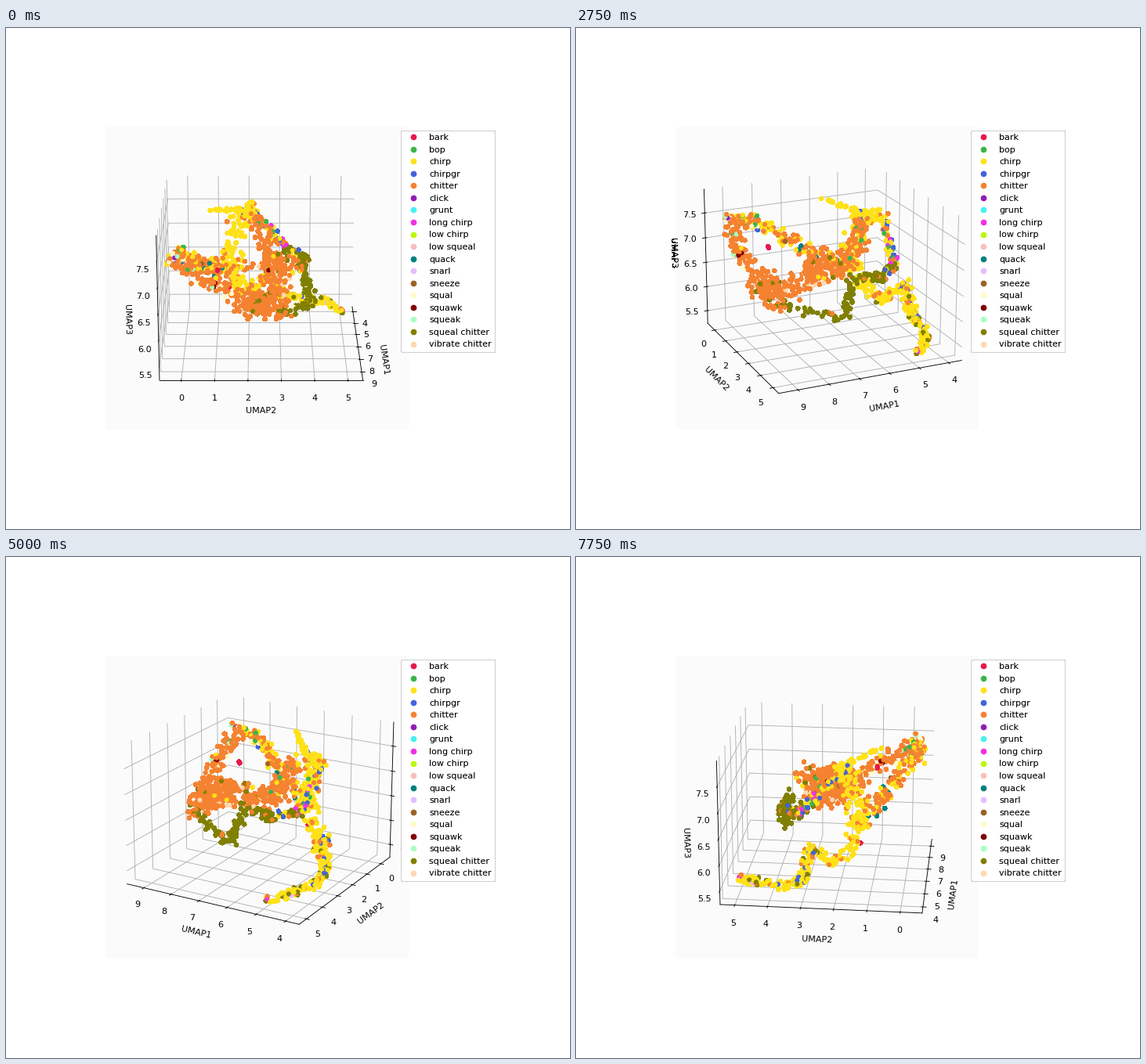
A matplotlib script that plays this animation: 720 px wide and 640 px high, repeating every 8 s.

```python
import numpy as np
import matplotlib.pyplot as plt
from matplotlib.animation import FuncAnimation
from matplotlib.lines import Line2D

W, H, DPI = 720, 640, 80
FRAMES, STEP_MS, STEP_DEG = 32, 250, 6
plt.rcParams["font.family"] = "DejaVu Sans"
rng = np.random.default_rng(7)

# One-letter key, call type, colour
CALLS = [
    ("k", "bark", "#e6194b"), ("b", "bop", "#3cb44b"),
    ("y", "chirp", "#ffe119"), ("g", "chirpgr", "#4363d8"),
    ("o", "chitter", "#f58231"), ("c", "click", "#911eb4"),
    ("t", "grunt", "#46f0f0"), ("m", "long chirp", "#f032e6"),
    ("l", "low chirp", "#bcf60c"), ("w", "low squeal", "#fabebe"),
    ("q", "quack", "#008080"), ("n", "snarl", "#e6beff"),
    ("z", "sneeze", "#9a6324"), ("p", "squal", "#fffac8"),
    ("r", "squawk", "#800000"), ("e", "squeak", "#aaffc3"),
    ("s", "squeal chitter", "#808000"), ("v", "vibrate chitter", "#ffd8b1"),
]
COLOR = {key: color for key, _, color in CALLS}

# Anchors of the cloud, measured from the middle of the box
SPOT = {
    "tip": (-.07, -.31, .39), "crest": (-.24, -.11, .33),
    "peak": (-.38, -.066, .29), "ridge": (-.354, .14, .06),
    "bend": (-.22, .265, .03), "hook": (-.03, .25, .05),
    "fang": (.05, .31, -.175), "keel": (.25, .20, -.13),
    "chin": (.39, .11, -.08), "jaw": (.40, .0, -.06),
    "neck": (.435, -.09, -.02), "cheek": (.478, -.28, .12),
    "nose": (.47, -.50, .26), "brow": (.29, -.505, .22),
    "arch": (.107, -.37, .115), "saddle": (-.05, -.285, .016),
    "drop": (-.22, -.19, -.04), "sag": (-.30, -.14, -.20),
    "dip": (-.38, -.04, -.237), "flank": (-.47, .07, -.11),
    "base": (-.505, .12, -.32), "shin": (-.50, .26, -.345),
    "heel": (-.46, .40, -.35), "toe": (-.338, .519, -.375),
    "head": (-.22, -.02, .27), "throat": (-.06, .07, .05),
    "low": (.33, .08, -.03), "mid": (.18, .10, .07),
    "back": (.20, .20, .125), "red": (.30, -.255, .13),
    "dark": (.16, .045, .08), "lone": (-.22, -.20, -.17),
}

# Route through the anchors, number of points, spread, colour mix
TRAILS = [
    ("tip crest", 22, .006, "y"),
    ("crest peak", 36, .026, "yyyyyyyog"),
    ("crest drop", 65, .038, "yyyyyyyyyo"),
    ("peak ridge", 42, .016, "yyyyygogobym"),
    ("ridge bend", 26, .018, "yosssogs"),
    ("bend hook", 40, .017, "sssssso"),
    ("hook fang", 32, .019, "s"),
    ("fang keel chin", 30, .018, "sssssop"),
    ("chin neck", 12, .035, "sso"),
    ("nose brow", 42, .026, "ooyoyobpoosoyo"),
    ("nose cheek", 48, .030, "ooooooobpyoooe"),
    ("cheek neck", 42, .030, "oooooooooopoo"),
    ("neck jaw chin", 85, .038, "oooooooooooooo"),
    ("brow arch", 48, .022, "oooyyyooygooyz"),
    ("arch saddle drop", 60, .028, "oooyyoooyyooq"),
    ("drop sag", 34, .028, "yyyyyyo"),
    ("sag dip flank", 42, .020, "yyyyyyyos"),
    ("flank base", 60, .020, "yyyyyyyogs"),
    ("base shin heel", 52, .015, "yyyyyyygos"),
    ("heel toe", 28, .012, "yyyynyyosy"),
    ("head throat", 75, .034, "ooooooooooboy"),
    ("throat mid low", 95, .046, "oooooooooooovooo"),
    ("mid back", 30, .035, "o"),
    ("back throat", 22, .038, "oooosy"),
    ("low neck", 35, .042, "o"),
    ("saddle throat", 16, .035, "ooyo"),
    ("nose", 2, .006, "c"), ("red", 2, .006, "k"), ("dark", 1, .0, "r"),
    ("lone", 1, .0, "k"), ("toe", 1, .0, "m"), ("ridge", 2, .015, "m"),
    ("cheek", 2, .012, "r"), ("nose", 5, .02, "p"),
]

LIMITS = np.array([(3.545, 9.62), (-.655, 5.445), (5.235, 7.975)])
SIDES = np.array([1.1905, 1.1905, .8929])


def trail(route, count, spread, mix):
    """Points scattered along a polyline, with a colour for each."""
    nodes = np.array([SPOT[name] for name in route.split()])
    at = rng.uniform(0, len(nodes) - 1, count)
    knots = np.arange(len(nodes))
    pts = np.column_stack([np.interp(at, knots, axis) for axis in nodes.T])
    pts += np.clip(rng.normal(0, 1, pts.shape), -1.8, 1.8) * spread
    return pts, [COLOR[key] for key in rng.choice(list(mix), count)]


def harden(img, dpi):
    """One-bit transparency: every touched pixel becomes solid."""
    img[..., 3] = img[..., 3] > .08
    return img, 0, 0


fig = plt.figure(figsize=(W / DPI, H / DPI), dpi=DPI, facecolor="white")
ax = fig.add_axes([127 / W, 127.5 / H, 387 / W, 387 / H], projection="3d")
ax.set_facecolor("#fbfbfb")
ax.set_agg_filter(harden)

clouds = [trail(*spec) for spec in TRAILS]
points = np.vstack([pts for pts, _ in clouds])
colors = [color for _, part in clouds for color in part]
points = LIMITS.mean(axis=1) + points * np.ptp(LIMITS, axis=1) / SIDES
ax.scatter(*points.T, c=colors, s=20, depthshade=False)

ax.set(xlabel="UMAP1", ylabel="UMAP2", zlabel="UMAP3",
       xticks=range(4, 10), yticks=range(6), zticks=np.arange(5.5, 7.6, .5))
ax.set(xlim=LIMITS[0], ylim=LIMITS[1], zlim=LIMITS[2])
for axis in (ax.xaxis, ax.yaxis, ax.zaxis):
    axis.pane.set_facecolor("none")
    axis.pane.set_edgecolor("white")

handles = [Line2D([], [], ls="", marker="o", ms=8, mec="white", color=color,
                  label=name) for _, name, color in CALLS]
ax.legend(handles=handles, loc="upper left", bbox_to_anchor=(.961, 1.0013),
          numpoints=1)


def update(i):
    ax.view_init(elev=20, azim=STEP_DEG * i)
    return ()


anim = FuncAnimation(fig, update, frames=FRAMES, interval=STEP_MS,
                     init_func=lambda: update(0), repeat=True, repeat_delay=0)
plt.show()
```
